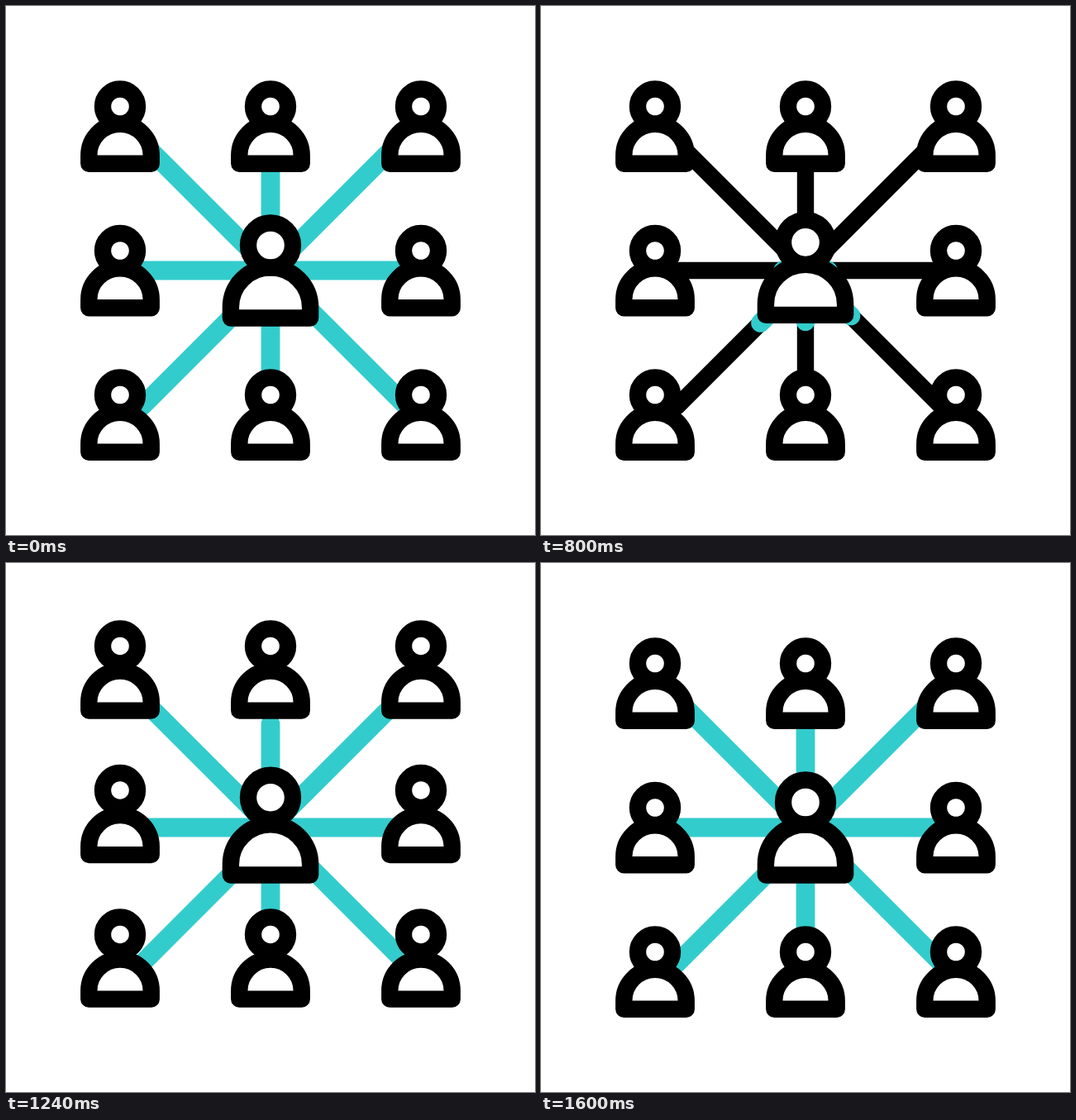
An HTML page with a canvas for the animation above (2 s loop, 640 by 640 pixels).

```html
<!DOCTYPE html>
<html lang="en">
<head>
<meta charset="utf-8">
<title>Network</title>
<style>
  html, body { margin: 0; width: 100%; height: 100%; overflow: hidden; background: #fff; }
  canvas { display: block; width: 100vw; height: 100vh; }
</style>
</head>
<body>
<canvas id="stage" width="640" height="640"></canvas>
<script>
const ctx = document.getElementById("stage").getContext("2d");
const LOOP = 2000, STEP = 40;
const BLACK = "#000", TEAL = "#33cccc";
const COLUMNS = [138, 320, 502];
const ROWS = [121.5, 296, 470.5];

// Spokes as [x1, y1, x2, y2], from the middle outwards
const SPOKES = [
  [320, 320, 177, 177],
  [320, 320, 320, 193],
  [320, 320, 463, 177],
  [300, 320, 167, 320],
  [340, 320, 473, 320],
  [271.5, 377.5, 164.5, 484.5],
  [320, 378, 320, 443],
  [368.5, 368.5, 484, 484]
];

const SMALL = { head: 21, dome: 37.7, domeY: 59, baseY: 69.3 };
const LARGE = { head: 27, dome: 48.1, domeY: 75, baseY: 88 };

function ease(t, from, to) {
  const u = Math.min(1, Math.max(0, (t - from) / (to - from)));
  return u * u * (3 - 2 * u);
}

// Rises during [a, b], stays, and falls during [c, d]
const hop = (t, a, b, c, d) => ease(t, a, b) - ease(t, c, d);

function drawSpokes(color, width, part) {
  ctx.strokeStyle = color;
  ctx.lineWidth = width;
  for (const [x1, y1, x2, y2] of SPOKES) {
    ctx.beginPath();
    ctx.moveTo(x1, y1);
    ctx.lineTo(x1 + (x2 - x1) * part, y1 + (y2 - y1) * part);
    ctx.stroke();
  }
}

function paintOutline() {
  ctx.fill();
  ctx.stroke();
}

function drawPerson(x, y, size, lift, headLift) {
  const bodyY = y - lift;
  ctx.fillStyle = "#fff";
  ctx.strokeStyle = BLACK;
  ctx.lineWidth = 20.4;

  ctx.beginPath();
  ctx.moveTo(x - size.dome, bodyY + size.baseY);
  ctx.arc(x, bodyY + size.domeY, size.dome, Math.PI, 0);
  ctx.lineTo(x + size.dome, bodyY + size.baseY);
  ctx.closePath();
  paintOutline();

  ctx.beginPath();
  ctx.arc(x, bodyY - headLift, size.head, 0, Math.PI * 2);
  paintOutline();
}

function draw(t) {
  ctx.fillStyle = "#fff";
  ctx.fillRect(0, 0, 640, 640);
  ctx.lineCap = ctx.lineJoin = "round";

  drawSpokes(BLACK, 20.4, 1);
  const fading = t < 480;
  const reach = fading ? 1 : ease(t, 720, 1280);
  if (reach > 0) {
    ctx.globalAlpha = fading ? 1 - t / 480 : 1;
    // Opaque core first, so that crossing spokes fade evenly
    drawSpokes(TEAL, 22.8, reach);
    ctx.globalAlpha = 1;
  }

  const lift = 12.2 * hop(t, 1000, 1250, 1320, 1520);
  const headLift = 25.3 * hop(t, 1160, 1360, 1440, 1600);
  for (const y of ROWS) {
    for (const x of COLUMNS) {
      if (x !== 320 || y !== 296) drawPerson(x, y, SMALL, lift, headLift);
    }
  }
  drawPerson(320, 289.5, LARGE,
    10.2 * hop(t, 680, 980, 1000, 1200),
    25 * hop(t, 860, 1040, 1130, 1290));
}

function tick() {
  const t = performance.now() % LOOP;
  draw(Math.floor(t / STEP) * STEP);
  requestAnimationFrame(tick);
}
tick();
</script>
</body>
</html>
```
